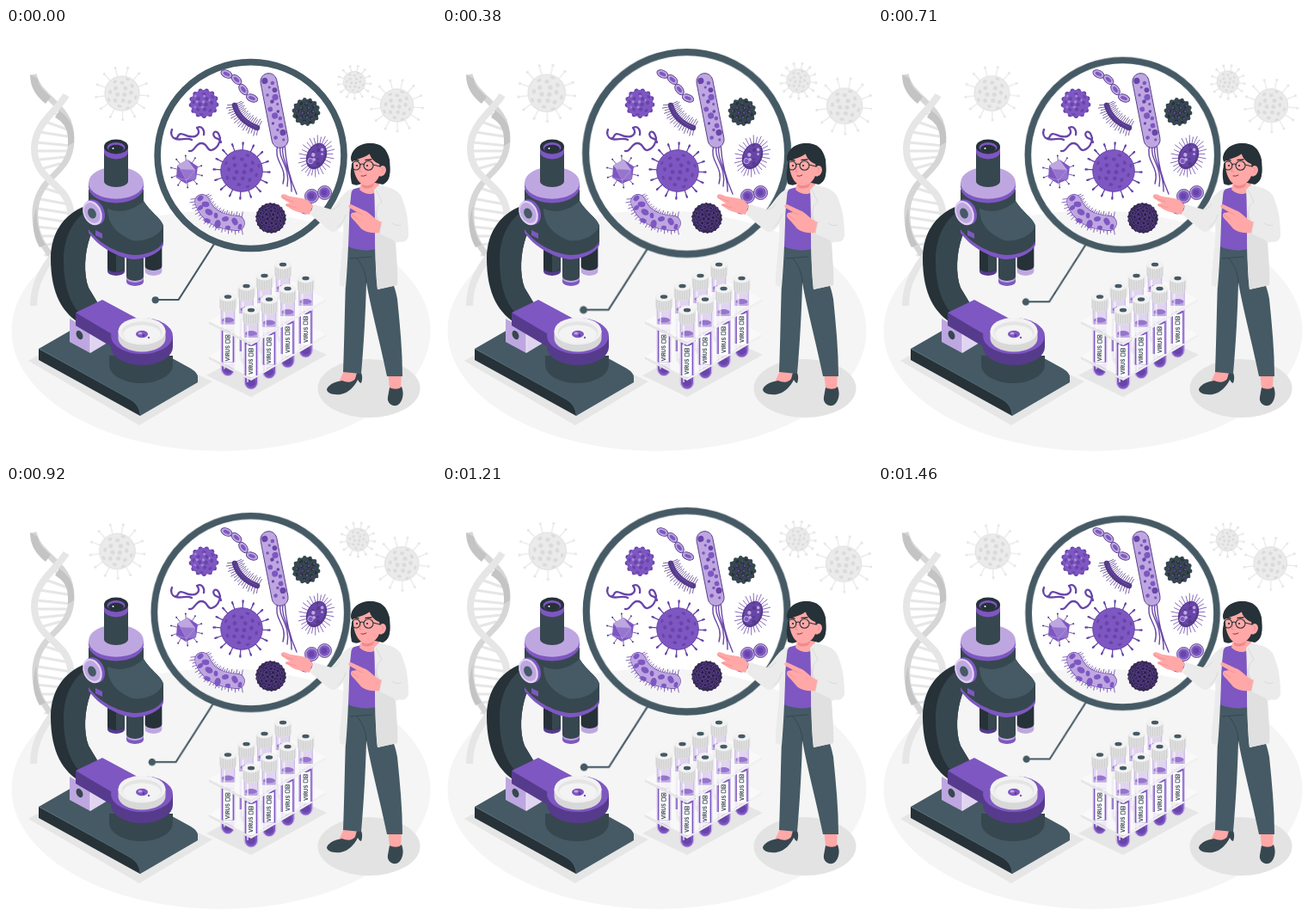
An HTML page for the animation above (1.5 s loop, 500 by 500 pixels).

```html
<!DOCTYPE html>
<html lang="en">
<head>
<meta charset="utf-8">
<title>Virus research</title>
<style>
  html, body { margin: 0; width: 100%; height: 100%; overflow: hidden; background: #fff; }
  svg { display: block; width: 100vw; height: 100vh; }
  #lens { transform-origin: 283px 178px; }
  #far { transform-origin: 293px 81px; }
</style>
</head>
<body>
<svg id="stage" viewBox="0 0 500 500"></svg>
<script>
const INK = '#263238', DARK = '#37474f', SLATE = '#455a64';
const PURPLE = '#7e57c2', DEEP = '#563b8c', MID = '#6845a8', LILAC = '#bea7e0', PALE = '#e0d4f0';
const SKIN = '#ffa8a7', BLUSH = '#f08a8c', COAT = '#ebebeb', FOLD = '#e0e0e0';

const f = n => +n.toFixed(2);
const shape = (d, fill, extra = '') => `<path d="${d}" fill="${fill}" ${extra}/>`;
const line = (d, color, w = 1, cap = 'round') =>
  `<path d="${d}" fill="none" stroke="${color}" stroke-width="${w}" stroke-linecap="${cap}" stroke-linejoin="round"/>`;
const oval = (x, y, rx, ry, fill, turn = 0, extra = '') =>
  `<ellipse cx="${f(x)}" cy="${f(y)}" rx="${f(rx)}" ry="${f(ry)}" fill="${fill}" transform="rotate(${f(turn)} ${f(x)} ${f(y)})" ${extra}/>`;
const dot = (x, y, r, fill, extra) => oval(x, y, r, r, fill, 0, extra);
const rep = (n, fn) => Array.from({ length: n }, (_, i) => fn(i)).join('');
const tube = (x, y, rx, ry, h, fill) =>
  shape(`M${x - rx} ${y}v${h}a${rx} ${ry} 0 0 0 ${2 * rx} 0v${-h}z`, fill);

// Spots spread over a ball, flattened towards its rim
function spots(x, y, r, n, size, fill, extra) {
  return rep(n, i => {
    const q = Math.sqrt((i + .5) / n) * .9, a = i * 2.4 + .5;
    return oval(x + r * q * Math.cos(a), y + r * q * Math.sin(a),
      size * Math.sqrt(1.05 - q * q), size, fill, a * 180 / Math.PI, extra);
  });
}

function rays(x, y, r0, r1, n, color, w, knob = 0, turn = .1) {
  return rep(n, i => {
    const a = turn + i * 2 * Math.PI / n, c = Math.cos(a), s = Math.sin(a);
    const ex = x + r1 * c, ey = y + r1 * s;
    return line(`M${f(x + r0 * c)} ${f(y + r0 * s)}L${f(ex)} ${f(ey)}`, color, w) +
      (knob ? dot(ex, ey, knob, color) : '');
  });
}

// Hairs on both sides of a quadratic curve, leaning outwards at its ends
function hairs(a, b, c, n, reach, color, w) {
  const at = (k, t) => (1 - t) ** 2 * a[k] + 2 * t * (1 - t) * b[k] + t * t * c[k];
  const slope = (k, t) => 2 * (1 - t) * (b[k] - a[k]) + 2 * t * (c[k] - b[k]);
  return rep(n, i => {
    const t = i / (n - 1), x = at(0, t), y = at(1, t);
    const dx = slope(0, t), dy = slope(1, t), k = (reach + i % 2 * 2) / Math.hypot(dx, dy);
    const lean = (t - .5) * .35;
    const tip = side => `${f(x + dx * lean * k - side * dy * k)} ${f(y + dy * lean * k + side * dx * k)}`;
    return line(`M${tip(1)}L${f(x)} ${f(y)}L${tip(-1)}`, color, w);
  });
}

const floor = oval(250, 352, 243.5, 140, '#f5f5f5') +
  shape('M26 387L100 345L240 411L155 462Z', '#e6e6e6') +
  shape('M233 404L322 356L373 380L285 429Z', '#e6e6e6') +
  oval(422, 419, 59.5, 34, '#e3e3e3');

function dna() {
  const rungs = line('M54 98L74 107M46 109L77 120M39 121L78 127M36 133L76 137M35 143L74 143M39 153L69 150M44 163L62 158' +
    'M47 187L69 194M40 199L73 205M37 210L76 216M35 220L74 226M35 231L74 235M36 242L72 242M40 253L67 249M46 264L62 259', '#e6e6e6', 3.2);
  const dark = 'M32 54C35 66 40 71 48 79C63 93 77 105 76 131C75 159 58 166 45 183C36 195 33 208 34 222C35 246 48 258 58 273';
  const light = 'M70 78C60 96 33 111 33 140C33 169 55 177 67 193C76 205 77 220 73 234C66 259 32 279 32 323';
  return rungs + line(dark, '#d6d6d6', 7, 'butt') +
    shape('M28 54L37 59C38 68 45 74 52 80L46 88C36 80 28 70 28 54ZM62 96C75 105 80 116 79 133L72 137C73 119 69 111 57 104Z' +
      'M36 207C34 216 37 240 46 252L39 255C30 240 30 222 36 207Z', '#c4c4c4') +
    line(light, '#e6e6e6', 8, 'butt');
}

const paleVirus = (x, y, r, reach, n) =>
  rays(x, y, r - 2, reach, n, '#e6e6e6', 1.1, 1.5) + dot(x, y, r, '#ebebeb') +
  dot(x, y, r - .5, 'none', 'stroke="#e2e2e2"') + spots(x, y, r, 17, r * .12, '#dadada');

const far = paleVirus(135, 76, 20.5, 30.5, 13) + paleVirus(405, 63, 13, 19, 13) + paleVirus(454.5, 90, 19.5, 30, 13);

const lens = dot(284.5, 148, 108.4, 'none', `stroke="${SLATE}" stroke-width="7.6"`) +
  line('M242 251L200.5 316H174', SLATE, 2) + dot(173.7, 316.2, 4.1, SLATE);

function microbes() {
  let s = '';
  const edge = `stroke="${DEEP}" stroke-width=".9"`;
  for (const [x, y, a] of [[256.5, 53.5, 25], [268, 60, 42], [276, 71.5, 55], [286, 81.5, 22]])
    s += oval(x, y, 7, 4.2, LILAC, a, edge) + oval(x, y, 4, 2, PURPLE, a);

  s += rays(230, 87.5, 12, 14.8, 13, MID, 3, 2.6) + dot(230, 87.5, 15.4, PURPLE) +
    spots(230, 87.5, 15, 12, 2.3, MID) + spots(227, 84.5, 12, 7, 1.7, '#a487d6');

  s += hairs([266, 89], [271, 108], [293, 116], 17, 8.5, DEEP, .8) +
    line('M266 90Q271 108 292 116', DEEP, 6.5) + line('M267 91Q273 107 291 115', MID, 1.2);

  s += line('M316 136C310 156 328 160 322 181M319 137C316 154 331 160 327 184M322 137C319 154 333 166 332 190M324 135C325 153 329 173 338 193', MID, 1.4);
  s += `<g transform="rotate(-11 312 96)"><rect x="302.5" y="52" width="19" height="88" rx="9.5" fill="${LILAC}" ${edge}/>` +
    rep(18, i => dot(312 + [-4.4, 4, -.5, 5][i % 4], 60 + i * 4.2, [3.6, 2.3, 1.6, 2.9, 1.8][i % 5], i % 3 ? PURPLE : MID)) + '</g>';

  s += rays(349, 97.5, 12, 14.2, 14, DARK, 3, 2.3) + dot(349, 97.5, 14.8, DARK) + spots(349, 97.5, 14.5, 17, 2.2, INK) +
    spots(349, 97.5, 13.5, 12, 1.3, MID);

  s += `<g transform="rotate(24 361 149)">` + rep(28, i => {
    const a = i * Math.PI / 14, c = Math.cos(a), v = Math.sin(a), k = i % 2 * 2;
    return line(`M${f(361 + 9 * c)} ${f(149 + 14 * v)}L${f(361 + (18 + k) * c)} ${f(149 + (23 + k) * v)}`, MID, .7);
  }) + oval(361, 149, 11.3, 16, DEEP) + oval(360.5, 148, 9.5, 14, MID) +
    rep(11, i => dot(361 + [-4, 3, -1, 5, -5][i % 5], 137 + i * 2.4, 1.4 + i % 3 * .4, i % 2 ? LILAC : DEEP)) +
    dot(357, 157, 3, PURPLE, `stroke="${LILAC}"`) + '</g>';

  const worms = 'M193 118C190 126 197 132 200 126C202 120 208 125 213 126C222 128 227 122 222 116C228 113 231 119 230 124' +
    'M197 129C204 131 210 127 216 130M213 143C219 145 220 134 227 134C235 134 233 143 239 142C246 140 249 133 249 128C246 116 239 121 242 126C244 130 249 127 250 133';
  s += line(worms, MID, 2.3);

  s += rays(210, 167, 12, 18.5, 10, DEEP, .8, 1, .25) +
    shape('M211 153L223 161L221 176L209 181L198 174L199 160Z', PURPLE) +
    shape('M211 153L203 164L199 160ZM203 164L220 165L211 153Z', LILAC) +
    shape('M220 165L221 176L210 177ZM203 164L220 165L210 177Z', '#9575cd') +
    line('M203 164L220 165L210 177ZM198 174L210 177L209 181', LILAC, .6);

  s += rays(274, 166, 22, 32, 16, MID, 1.3, 0, .05) + rays(274, 166, 30.5, 32.5, 16, MID, 2, 1.1, .05) +
    dot(274, 166, 24.3, PURPLE, `stroke="${MID}" stroke-width="1"`) + spots(274, 166, 23.5, 19, 2.4, MID);

  for (const [x, y] of [[348, 208], [355.5, 195.5], [370.5, 191.5]])
    s += dot(x, y, 8, LILAC, edge) + dot(x, y, 6.2, PURPLE) + dot(x - .5, y, 3.4, MID);

  s += hairs([226, 198], [234, 227], [273, 227], 22, 11, MID, .8) +
    line('M228 202Q236 225 269 227', MID, 17.8) + line('M228 202Q236 225 269 227', LILAC, 16.6);
  for (const [x, y, r] of [[226, 198, 3.2], [232, 205, 3.7], [226, 209, 2.8], [236, 214, 4], [234, 224, 3.2], [244, 218, 2.8],
    [246, 228, 4.2], [255, 222, 3.4], [258, 232, 2.6], [266, 225, 3.8], [272, 231, 2.8]])
    s += oval(x, y, r * 1.2, r * .85, PURPLE, x * 7);

  s += rays(308, 221, 15, 16.6, 22, '#382b57', 2, 1.3) + dot(308, 221, 17.3, '#382b57') +
    spots(308, 221, 17, 24, 2.3, '#2b2144', `stroke="${MID}" stroke-width=".8"`);
  return s;
}

function microscope() {
  let s = shape('M38 373L104 335L215 396Q223 401 223 406V412L156 451L146 434Z', SLATE) +
    shape('M38 373L143 431Q156 438 156 451L38 386Z', INK) + line('M39 373L143 431Q156 438 156 450', '#607d8b', .5);
  s += tube(157, 381, 37, 21, 11, DARK);
  // arm
  s += shape('M98 205C70 213 52 236 52 268C52 309 66 333 89 345L108 333V322L96 302C90 286 91 262 98 242L116 230Z', INK) +
    shape('M101 209C80 218 67 241 67 270C67 303 76 325 92 338L108 330V322L96 302C90 286 91 262 98 242L114 230Z', DARK);
  // stage support
  s += shape('M74 338L98 351V378L74 365Z', LILAC) + shape('M98 351L118 356V366L98 378Z', PALE) +
    oval(85.5, 357, 3.6, 5.4, DARK, -25) + line('M98 352V377', '#fff', .6);
  s += shape('M81 331L112 316L166 345L124 365Z', PURPLE) + shape('M81 331L125 357V372L81 346Z', DEEP);
  s += tube(158, 358, 36, 21, 13, DEEP) + oval(158, 358, 36, 21, PURPLE);
  s += tube(158, 352, 27.5, 15.5, 9, '#d8d8d8') + oval(158, 352.5, 27.5, 15.8, '#f2f2f2') +
    oval(158, 354, 23.5, 12.8, '#e4e4e4') + oval(158, 356, 22, 10.5, '#f3f3f3') +
    oval(158, 356, 7, 4.2, PURPLE) + oval(156, 355, 2.5, 1.5, LILAC) + dot(160, 357.5, 1.3, DEEP) + dot(166, 360, 1.2, PURPLE);
  // objectives
  s += tube(128, 255, 10, 5, 28, DEEP) + tube(128, 255, 10, 5, 24, INK) + shape('M128 255h10v25q-4 3-10 4Z', DARK);
  s += tube(171.5, 250, 9.8, 5, 33, LILAC) + tube(171.5, 250, 9.8, 5, 27, INK);
  s += tube(150, 260, 10, 5, 35, PURPLE) + tube(150, 260, 10, 5, 31, LILAC) + tube(150, 260, 10, 5, 29, DARK);
  // head
  s += shape('M96 222V238C107 254 128 266 147 269C163 269 179 262 183 252V236Z', PURPLE) +
    shape('M96 188V234C107 250 129 262 148 264C164 264 179 258 183 248V230C180 221 167 213 160 201V188Z', DARK) +
    shape('M118 210C137 218 153 208 160 201C166 213 181 221 183 230C178 243 160 249 147 247C132 241 118 230 118 210Z', SLATE) +
    shape('M104 235L112 239V245L104 241Z', PURPLE);
  s += tube(128, 180, 32, 18.5, 5, PURPLE) + oval(128, 180, 32, 18.8, LILAC);
  s += tube(128, 142, 14, 7, 36, DARK) + tube(128, 139, 14, 8.5, 5, PURPLE) + oval(128, 138, 14, 8.5, INK) +
    oval(128, 139, 10.5, 6, PURPLE) + oval(128, 140.4, 9, 4.6, INK) + dot(124.5, 140, 1, '#fff');
  s += oval(103, 214, 11, 15.5, PURPLE, -25) + oval(100.5, 215, 10.5, 15, PALE, -25) +
    oval(100.2, 215, 8.6, 12.5, LILAC, -25) + oval(100, 215.5, 4.5, 6.3, SLATE, -25);
  return s;
}

function rack() {
  const places = [[322, 275], [300.5, 288], [279.5, 300], [258, 312.5], [348.5, 291], [327.5, 303], [306, 315.5], [285, 328]];
  const defs = `<defs><g id="vial">` +
    shape('M-7.8 8V84a7.8 8 0 0 0 15.6 0V8Z', PALE, `stroke="${LILAC}" stroke-width=".8"`) +
    shape('M-7 27V84a7 7.5 0 0 0 14 0V27Z', LILAC) + shape('M-7 38V84a7 7.5 0 0 0 14 0V38Z', PURPLE) +
    oval(0, 27, 7, 3, '#9575cd') + oval(0, 84, 5, 5, MID) + shape('M-5 18V84H-3V18Z', '#fff', 'opacity=".6"') +
    shape('M-5.6 40Q0 44 5.6 40V76Q0 80-5.6 76Z', '#fff') +
    `<text transform="translate(2.2 75) rotate(-90)" font-family="Inter, Arial, sans-serif" font-size="6" font-weight="700" fill="${DARK}">VIRUS</text>` +
    line('M-2.2 44.6h4.4v4h-4.4zM-2.2 50.2h4.4v3.6h-4.4zM-1 45.4l2 2.4M1 45.4l-2 2.4', DARK, .8) +
    tube(0, 0, 9.8, 5.2, 12, '#e0e0e0') + rep(7, i => line(`M${f(-8.2 + i * 2.7)} 4V${f(14.5 + 1.5 * Math.sin(i / 2))}`, '#cbcbcb', .8)) +
    oval(0, 0, 9.8, 5.4, '#f2f2f2') + oval(0, 0, 4.2, 2.3, SLATE) + '</g>' +
    [['top', -10, 42], ['mid', 32, 44], ['low', 74, 26]].map(([id, y, h]) =>
      `<clipPath id="${id}"><rect x="-12" y="${y}" width="24" height="${h}"/></clipPath>`).join('') + '</defs>';
  const part = id => places.map(([x, y]) =>
    `<g transform="translate(${x} ${y})"><g clip-path="url(#${id})"><use href="#vial"/></g></g>`).join('');
  const shelf = y => shape(`M236 ${y}L323 ${y - 51}L372 ${y - 26}L285 ${y + 25}Z`, '#fafafa', 'opacity=".9"') +
    shape(`M236 ${y}L285 ${y + 25}v3L236 ${y + 3}Z`, '#e6e6e6') + shape(`M285 ${y + 25}L372 ${y - 26}v3L285 ${y + 28}Z`, '#f0f0f0');
  return defs + part('low') + shelf(382) + part('mid') + shelf(341) + part('top');
}

function woman() {
  let s = '';
  // feet and shoes
  s += shape('M394 396H409L407 410L396 416L387 412Z', SKIN) + shape('M444 400H460L459 420L449 424L446 418Z', SKIN) +
    shape('M373 420C376 413 385 411 391 410C396 412 402 413 406 408L409 397C415 400 415 408 413 413L411 412L409 409C405 417 399 424 389 426C379 427 373 424 373 420Z', DARK) +
    shape('M446 418C450 420 456 421 460 417C464 427 460 437 454 439C447 440 443 435 444 429Z', DARK);
  // trousers
  s += shape('M397 252H432C440 280 452 294 455 315C458 345 461 375 461 405H443C436 370 424 325 419 296C418 334 416 366 413 402L392 400C394 350 394 300 397 252Z', SLATE) +
    line('M419 296C419 284 413 274 408 268M400 268L425 266', DARK, 1);
  // shirt and neck
  s += shape('M398 190C409 184 427 182 435 188L431 257Q415 261 397 254Z', PURPLE) +
    shape('M414 174H434V186C430 195 419 195 411 188Z', SKIN) + shape('M414 180Q423 184 430 178L426 185Q419 188 414 185Z', BLUSH);
  // coat
  s += shape('M404 187C394 189 390 197 386 205L379 237L392 225C394 250 387 278 388 299L395 302C398 268 399 228 400 193Z', COAT) +
    shape('M433 183C451 185 459 190 462 203C468 217 468 234 467 244L453 250C454 270 456 287 455 299L432 304C428 270 430 222 428 188Z', COAT) +
    shape('M429 210C435 232 447 241 453 250C454 269 456 287 455 299L432 304C429 270 429 240 429 210Z', FOLD) +
    line('M430 188L437 202L432 207L430 222', '#d6d6d6', .8);
  // pointing arm
  s += shape('M357 206L350 200C342 196 333 198 326 194C321 192 318 195 321 198L330 204C324 204 323 206 328 208C335 214 344 215 353 217Z', SKIN) +
    line('M321 197L334 202M326 206L337 209', BLUSH, .7) +
    shape('M358 205L378 211C386 203 391 191 402 187L399 215C393 229 386 238 379 237C370 232 362 223 354 217Z', COAT) +
    line('M378 211Q384 211 388 205M386 231Q393 226 395 217', '#d6d6d6', .8);
  // folded arm
  s += shape('M438 226C429 224 423 214 416 212L401 205C397 205 398 209 401 210L408 214L402 215C399 219 403 222 405 224L411 231C416 238 427 239 437 238Z', SKIN) +
    line('M408 214L414 217M402 217L410 223', BLUSH, .7) +
    shape('M458 193C466 208 468 230 468 242C466 251 456 250 447 245L434 239L437 225L449 226Z', COAT) +
    line('M437 225L434 239M449 227Q455 231 459 229', '#d6d6d6', .8);
  // head
  s += shape('M404 155C399 166 401 175 402 181C407 184 413 183 416 177L438 182C448 178 447 164 446 153C443 139 435 133 421 134C408 135 401 144 401 153Z', INK) +
    shape('M404 151C412 151 418 149 422 146C426 150 430 154 435 158C439 154 444 158 443 165C442 170 438 174 434 172C431 180 424 184 417 183C409 181 404 169 404 159Z', SKIN) +
    shape('M402 156C406 152 416 152 423 146C424 152 429 156 434 158L436 167L439 181C448 178 447 165 445 151C440 137 429 132 417 135C405 138 399 147 402 156Z', INK) +
    oval(437.5, 166, 4.3, 6, SKIN, 15) + line('M437 163Q440 164 437 168', BLUSH, .8);
  s += line('M405 153.5L410 154M418 153.5L425 153', INK, 1.3) + dot(408, 160, 1.1, INK) + dot(420, 160, 1.1, INK) +
    oval(407, 160, 4.8, 5, 'none', 0, `stroke="${INK}" stroke-width="1.1"`) +
    oval(421.5, 160, 5.5, 5.3, 'none', 0, `stroke="${INK}" stroke-width="1.1"`) +
    line('M412 159Q414 157 416 159M427 159L435 161', INK, 1.1) +
    line('M413 161L411 167H414', BLUSH, .9) + line('M413 172Q416 173 419 171', '#8d3541', 1);
  return s;
}

document.getElementById('stage').innerHTML =
  floor + dna() + `<g id="far">${far}</g><g id="lens">${lens}</g>` + microbes() + microscope() + rack() + woman();

// [time in ms, scale]
const pulse = [[0, 1], [208, 1.09], [265, 1.099], [390, 1.083], [542, 1.053], [708, 1.017], [795, 1.002],
  [917, 1.034], [1083, 1.091], [1125, 1.1], [1208, 1.079], [1458, 1.011], [1500, 1]];
const steps = pulse.map(([t, s]) => ({ offset: t / 1500, transform: `scale(${s})` }));
for (const id of ['far', 'lens'])
  document.getElementById(id).animate(steps, { duration: 1500, iterations: Infinity });
</script>
</body>
</html>
```
